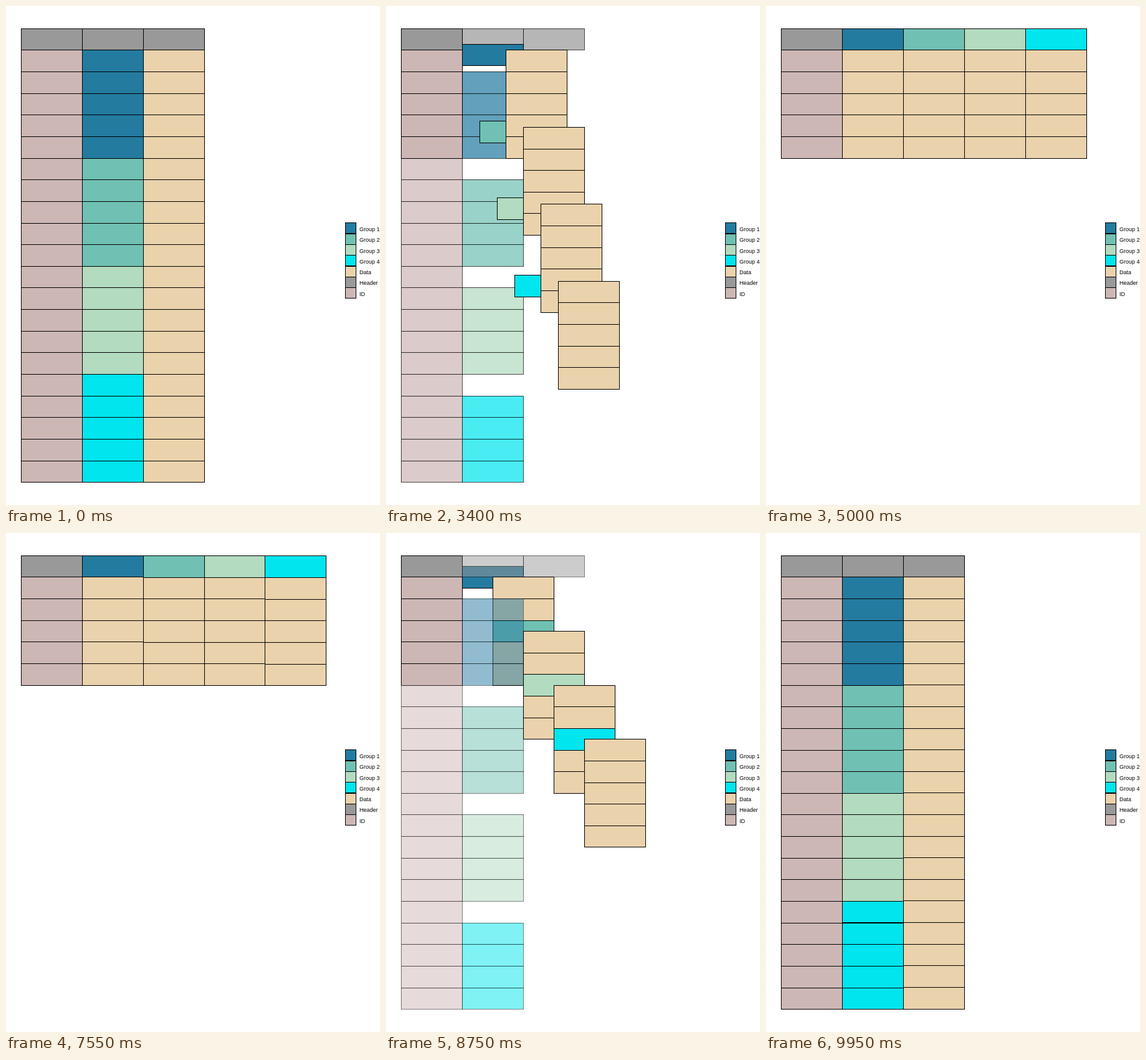
Recreate the animation shown at these times as an HTML page with a canvas. Size 600 by 800 pixels, loop 10 s.

```html
<!DOCTYPE html>
<html lang="en">
<head>
<meta charset="utf-8">
<title>Long table to wide table</title>
<style>
  html, body { margin: 0; width: 100%; height: 100%; overflow: hidden; background: #fff; }
  canvas { display: block; }
</style>
</head>
<body>
<canvas id="stage" width="600" height="800"></canvas>
<script>
const ctx = document.getElementById('stage').getContext('2d');

const LOOP = 10000, TICK = 50, HOLD = 2500;
const LEFT = 24.48, COL = 97.92;
const TOP = 800 / 22, ROW = 800 / 23.1;
const GROUPS = ['#247BA0', '#70C1B3', '#B2DBBF', '#00E5EE'];
const DATA = '#EAD2AC', HEADER = '#999999', ID = '#CDB7B5';
const SIZE = 5; // rows per group

const range = n => [...Array(n).keys()];
const mix = (a, b, p) => a + (b - a) * p;

// Box with a one pixel outline, snapped to whole pixels
function box(x0, y0, x1, y1, color) {
  [x0, y0, x1, y1] = [x0, y0, x1, y1].map(Math.floor);
  ctx.fillStyle = color;
  ctx.fillRect(x0, y0, x1 - x0, y1 - y0);
  ctx.strokeRect(x0 + 0.5, y0 + 0.5, x1 - x0, y1 - y0);
}

function cell(col, row, color) {
  box(LEFT + COL * col, TOP + ROW * row,
      LEFT + COL * (col + 1), TOP + ROW * (row + 1), color);
}

// Cells that exist only in the long table
function drawExtras(alpha) {
  if (alpha <= 0) return;
  ctx.globalAlpha = alpha;
  cell(1, 0, HEADER);
  cell(2, 0, HEADER);
  for (let row = SIZE + 1; row <= 4 * SIZE; row++) cell(0, row, ID);
  GROUPS.forEach((color, g) => {
    for (let i = 2; i <= SIZE; i++) cell(1, g * SIZE + i, color);
  });
  ctx.globalAlpha = 1;
}

function drawIds() {
  cell(0, 0, HEADER);
  for (let row = 1; row <= SIZE; row++) cell(0, row, ID);
}

function drawGroupCell(g, wide) {
  cell(mix(1, g + 1, wide), mix(g * SIZE + 1, 0, wide), GROUPS[g]);
}

function drawData(g, wide) {
  for (let i = 1; i <= SIZE; i++) {
    cell(mix(2, g + 1, wide), mix(g * SIZE + i, i, wide), DATA);
  }
}

function drawLegend() {
  const key = 17.28, x = 544.3, y = 347.75, inset = 0.14;
  const entries = [...GROUPS.map((color, g) => [color, 'Group ' + (g + 1)]),
                   [DATA, 'Data'], [HEADER, 'Header'], [ID, 'ID']];
  ctx.font = '9px "Liberation Sans", Arial, sans-serif';
  entries.forEach(([color, label], i) => {
    const top = y + key * i;
    box(x + inset, top + inset, x + key - inset, top + key - inset, color);
    ctx.fillStyle = '#000';
    ctx.fillText(label, 567, Math.round(top + 13.3));
  });
}

// 0 = long table, 1 = wide table
function wideness(t) {
  const ease = p => (1 - Math.cos(Math.PI * p)) / 2;
  if (t < HOLD) return 0;
  if (t < 2 * HOLD) return ease(t / HOLD - 1);
  if (t <= 3 * HOLD) return 1;
  return 1 - ease(t / HOLD - 3);
}

function draw(t) {
  const wide = wideness(t), groups = range(GROUPS.length);
  ctx.fillStyle = '#fff';
  ctx.fillRect(0, 0, 600, 800);
  ctx.strokeStyle = '#000';
  ctx.lineWidth = 1;

  // Extras leave beneath the moving cells and return above them
  if (t < 3 * HOLD) {
    drawExtras(1 - wide);
    drawIds();
    groups.forEach(g => drawGroupCell(g, wide));
    groups.forEach(g => drawData(g, wide));
  } else {
    drawIds();
    groups.forEach(g => { drawGroupCell(g, wide); drawData(g, wide); });
    drawExtras(1 - wide);
  }
  drawLegend();
}

const start = performance.now();
function tick() {
  const t = Math.max(0, performance.now() - start) % LOOP;
  draw(Math.floor(t / TICK) * TICK);
  requestAnimationFrame(tick);
}
tick();
</script>
</body>
</html>
```
